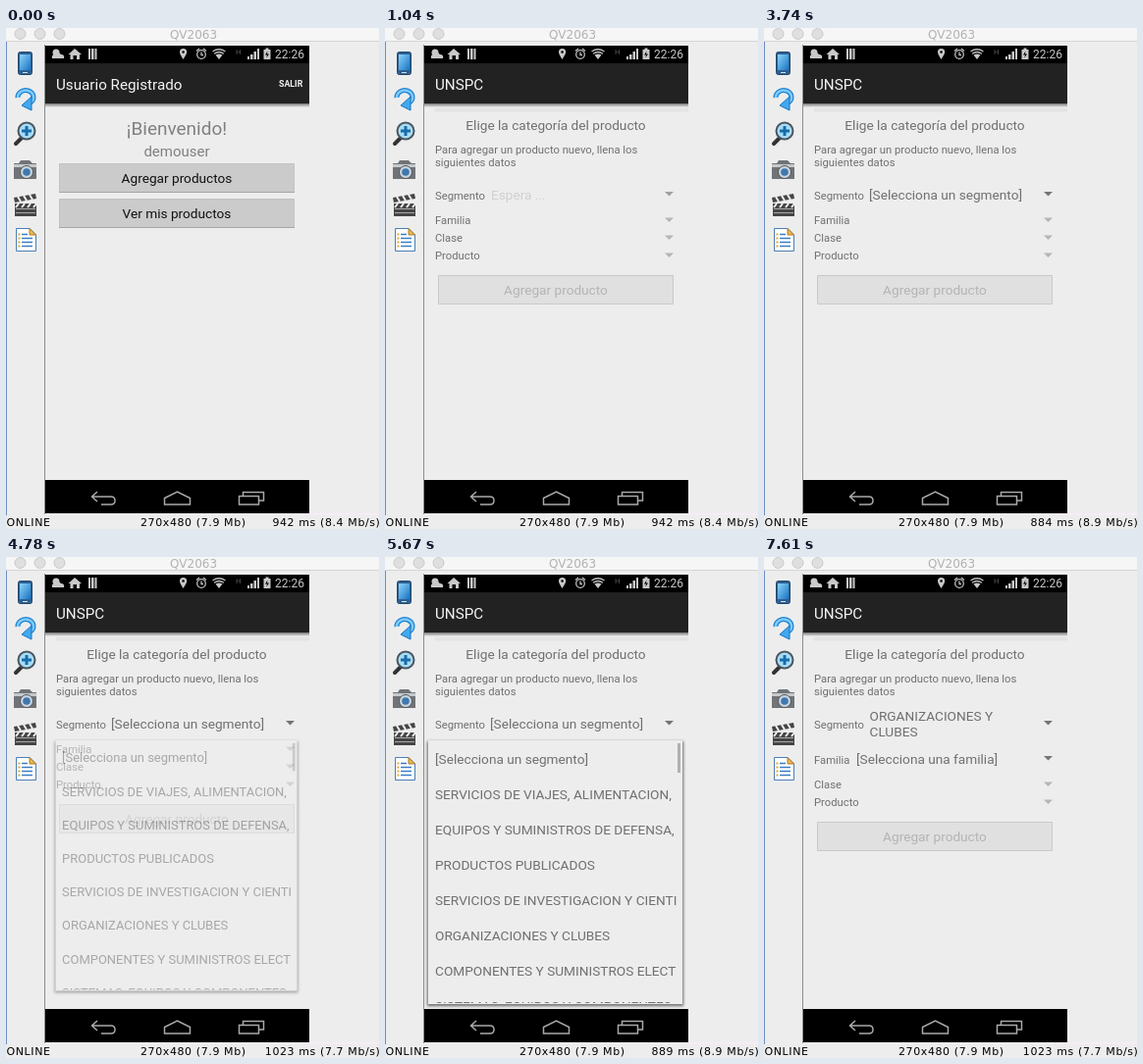
Recreate the animation shown at these times as an HTML page. Size 380x511 px, loop 8000 ms.

```html
<!DOCTYPE html>
<html lang="es">
<head>
<meta charset="utf-8">
<title>Agregar producto</title>
<style>
  html, body { margin: 0; width: 100%; height: 100%; overflow: hidden; background: #ededed; }
  svg { display: block; width: 380px; height: 511px; font-family: Roboto, sans-serif; }
  .desk { font: 11px "DejaVu Sans", sans-serif; letter-spacing: .6px; }
  .bar { font-size: 15.2px; fill: #f4f4f4; }
  .small { font-size: 11.25px; fill: #707070; }
  .value { font-size: 13.65px; fill: #707070; }
  .off { fill: #b4b4b4; }
  .dark { fill: #111; }
  .mid { text-anchor: middle; }
</style>
</head>
<body>
<svg viewBox="0 0 380 511">
  <defs>
    <linearGradient id="blue" x2="1" y2="1">
      <stop stop-color="#8fd4fa"/><stop offset="1" stop-color="#1673c4"/>
    </linearGradient>
    <linearGradient id="shade" x2="0" y2="1">
      <stop stop-color="#777"/><stop offset="1" stop-color="#ededed"/>
    </linearGradient>
    <filter id="blur" x="-5%" y="-5%" width="110%" height="110%"><feGaussianBlur stdDeviation="1.5"/></filter>
    <clipPath id="listClip"><path d="M44 187H298V455H44z"/></clipPath>
  </defs>

  <!-- desktop window -->
  <path fill="#ededed" d="M0 0H380V511H0z"/>
  <path fill="#f6f6f6" d="M0 0H380V13H0z"/>
  <path fill="#d5d5d5" d="M0 13H380V14H0z"/>
  <path fill="#6d8fc0" d="M0 14H1V497H0z"/>
  <g fill="#dfdfdf" stroke="#cacaca">
    <circle cx="14.500" cy="6" r="5.500"/><circle cx="34.500" cy="6" r="5.500"/><circle cx="54.500" cy="6" r="5.500"/>
  </g>
  <text class="mid" x="191" y="11" font-size="12" fill="#b2b2b2" style="font-family:'DejaVu Sans',sans-serif">QV2063</text>

  <!-- toolbar -->
  <g id="tools">
    <rect x="12.500" y="24.500" width="14" height="23" rx="2" fill="#2d5f91" stroke="#25476b"/>
    <path fill="url(#blue)" d="M14 27H25V43H14z"/>
    <path stroke="#cfe2f2" d="M17 45.500H22"/>
    <path fill="none" stroke="#1d83d2" stroke-width="5" d="M12 71A8 7 0 1 1 25 76"/>
    <path fill="none" stroke="#7fcbfa" stroke-width="2.500" d="M12 71A8 7 0 1 1 25 76"/>
    <path fill="#42a8ee" stroke="#1873c0" d="M26 70V84L16 79z"/>
    <path stroke="#333" stroke-width="4" stroke-linecap="round" d="M10 118L16 112"/>
    <circle cx="21" cy="105" r="8.500" fill="#a8dcf4" stroke="#4b5660" stroke-width="2"/>
    <path stroke="#176da9" stroke-width="3" d="M16 105H26M21 100V110"/>
    <path fill="#707478" d="M8 138H13L15 135H24L27 138H31V154H8z"/>
    <path fill="#c6cacc" d="M8 139H31V142H8z"/>
    <circle cx="21" cy="147" r="6.500" fill="#c9d5df" stroke="#555"/>
    <circle cx="21" cy="147" r="3.800" fill="#3f78ad"/>
    <path fill="#454545" d="M9 179H31V192H9zM8 173L30 169L31 174L9 178z"/>
    <path stroke="#f1f1f1" stroke-width="2" d="M12 172L15 177M18 171L21 176M24 170L27 175M13 179L10 183M19 179L16 183M25 179L22 183M31 179L28 183"/>
    <path stroke="#aaa" d="M10 184.500H30M10 188.500H30"/>
    <path fill="#fff" stroke="#4b7fb5" d="M10.500 204.500H24L30.500 211V227.500H10.500z"/>
    <path fill="#f0b84c" stroke="#a97c2d" d="M24 204.500V211H30.500z"/>
    <path stroke="#397dc2" stroke-width="1.500" d="M16 210.500H22M16 214.500H27M16 218.500H27M16 222.500H27"/>
    <path stroke="#e2a63c" stroke-width="2" d="M12.500 210.500H14.500M12.500 214.500H14.500M12.500 218.500H14.500M12.500 222.500H14.500"/>
  </g>

  <!-- phone -->
  <path fill="#8c8c8c" d="M39 17H40V496H39z"/>
  <path fill="#f7ecf7" d="M40 495H380V496.500H40z"/>
  <path d="M40 18H309V36H40zM40 461H309V495H40z"/>
  <path fill="#222" d="M40 36H309V77H40z"/>
  <path fill="url(#shade)" d="M40 77H309V81H40z"/>
  <g fill="#c9c9c9">
    <circle cx="51" cy="25" r="3.500"/>
    <path d="M47 31Q46 27 50 27Q53 23 56 27Q60 27 59 31z"/>
    <path d="M70 21L77 27H75V32H72V28H68.500V32H65.500V27H63.500z"/>
    <path d="M84 21H86V32H84zM87 21H89.500V32H87zM90.500 21H92.500V32H90.500z"/>
    <path fill-rule="evenodd" d="M180.500 32C179 29 177 27 177 24.500A3.600 3.600 0 0 1 184.200 24.500C184.200 27 182 29 180.500 32zM179.300 24.500A1.300 1.300 0 0 0 181.900 24.500A1.300 1.300 0 0 0 179.300 24.500z"/>
    <path d="M217 32L213.500 27.500Q217 25.300 220.500 27.500z"/>
    <path d="M246 32V29H248V32zM249 32V27H251.500V32zM252.500 32V24H255V32zM256 32V21H258V32z"/>
    <path fill-rule="evenodd" d="M262.500 22H264.500V20.500H267.500V22H269.500V32H262.500zM266.500 23.500L264 27.500H266L265.300 30.500L268 26.500H266z"/>
    <text x="274" y="31" font-size="12">22:26</text>
    <text x="234" y="27" font-size="8" fill="#555">H</text>
  </g>
  <g fill="none" stroke="#bdbdbd" stroke-width="1.300">
    <circle cx="199" cy="27" r="4.300"/>
    <path d="M199 24.500V27.500H201M194 23.500L197 21M204 23.500L201 21"/>
    <path d="M210.500 24Q217 19.500 223.500 24M212 26.200Q217 22.800 222 26.200"/>
  </g>
  <g fill="none" stroke="#a9a9a9" stroke-width="1.500">
    <path d="M93 473L87.500 478L93 483M88 478H107Q111 478 111 482T107 486H97"/>
    <path d="M161.500 486V479.500L174.500 473L187.500 479.500V486z"/>
    <path d="M237.500 477.500H257.500V486H237.500zM241.500 477V473.500H262.500V482H258"/>
  </g>

  <g id="home">
    <text class="bar" x="51" y="63">Usuario Registrado</text>
    <text x="278" y="60" font-size="8.800" font-weight="700" fill="#f4f4f4">SALIR</text>
    <g class="mid">
      <text x="174" y="109" font-size="19" fill="#808080">¡Bienvenido!</text>
      <text x="174" y="131" font-size="15" fill="#808080">demouser</text>
    </g>
  </g>

  <g id="form">
    <text class="bar" x="51" y="63">UNSPC</text>
    <path fill="#e3e3e3" d="M51 82H309V85.500H51z"/>
    <text class="value mid" x="174" y="104">Elige la categoría del producto</text>
    <text class="small" x="51" y="128">Para agregar un producto nuevo, llena los</text>
    <text class="small" x="51" y="141">siguientes datos</text>
    <text class="small" x="51" y="174.500">Segmento</text>
    <g id="waiting"></g>
    <g id="segment"></g>
    <g id="early"></g>
    <g id="chosen"></g>
  </g>

  <g id="popup">
    <rect x="43" y="188" width="261" height="270" fill="#000" opacity=".55" filter="url(#blur)"/>
    <path fill="#ededed" d="M44 187H303V456H44z"/>
    <g id="list" class="value" clip-path="url(#listClip)"></g>
    <path fill="#b0b0b0" d="M298 190H301V220H298z"/>
  </g>

  <!-- status line -->
  <g class="desk">
    <text x="0.500" y="508">ONLINE</text>
    <text x="137" y="508">270x480 (7.9 Mb)</text>
    <text id="speed" x="381.500" y="508" text-anchor="end"></text>
  </g>
</svg>

<script>
const $ = id => document.getElementById(id);
const add = (id, ...parts) => $(id).insertAdjacentHTML('beforeend', parts.join(''));
const text = (cls, x, y, s) => `<text class="${cls}" x="${x}" y="${y}">${s}</text>`;
const caret = (y, color) => `<path fill="${color}" d="M285 ${y - 2}h9l-4.500 4.500z"/>`;
const button = (y, label, enabled) =>
  `<path fill="${enabled ? '#cbcbcb' : '#e0e0e0'}" stroke="${enabled ? '#c3c3c3' : '#c9c9c9'}" d="M54.500 ${y + .5}h239v29h-239z"/>` +
  (enabled ? `<path fill="#a5a5a5" d="M54 ${y + 29}h240v1h-240z"/>` : '') +
  text('value mid ' + (enabled ? 'dark' : 'off'), 174, y + 20, label);
const emptyField = (label, y) => text('small', 51, y, label) + caret(y - 4, '#b5b5b5');

const DARK = '#747474';
add('home', button(138, 'Agregar productos', true), button(174, 'Ver mis productos', true));
add('waiting', text('value', 108, 174.5, 'Espera ...').replace('<text', '<text style="fill:#d0d0d0"'), caret(169, '#a0a0a0'));
add('segment', text('value', 107, 174.5, '[Selecciona un segmento]'), caret(169, DARK));
add('early', emptyField('Familia', 199.5), emptyField('Clase', 217.5), emptyField('Producto', 235.5),
  button(252, 'Agregar producto', false));
add('chosen', text('value', 107.5, 167, 'ORGANIZACIONES Y'), text('value', 107.5, 182.5, 'CLUBES'), caret(169, DARK),
  text('small', 51, 210.5, 'Familia'), text('value', 94, 210.5, '[Selecciona una familia]'), caret(205, DARK),
  emptyField('Clase', 235.5), emptyField('Producto', 253.5), button(270, 'Agregar producto', false));
add('list', ...[
  '[Selecciona un segmento]',
  'SERVICIOS DE VIAJES, ALIMENTACION,',
  'EQUIPOS Y SUMINISTROS DE DEFENSA,',
  'PRODUCTOS PUBLICADOS',
  'SERVICIOS DE INVESTIGACION Y CIENTI',
  'ORGANIZACIONES Y CLUBES',
  'COMPONENTES Y SUMINISTROS ELECT',
  'SISTEMAS, EQUIPOS Y COMPONENTES'
].map((s, i) => text('value', 51, 210.5 + 36 * i, s)));

const LOOP = 8000;
// [start time, transfer time], both in ms
const transfers = [[0, 942], [140, 963], [1040, 942], [1940, 905], [2840, 921],
  [3740, 884], [4780, 1023], [5670, 889], [6570, 868], [7610, 1023]];

const show = (id, on) => $(id).style.display = on ? '' : 'none';

function draw(t) {
  show('home', t < 140);
  show('form', t >= 140);
  show('waiting', t < 1190);
  show('segment', t >= 1190 && t < 5820);
  show('early', t < 5820);
  show('chosen', t >= 5820);
  show('popup', t >= 3880 && t < 5820);

  const opening = t < 4920;
  $('popup').setAttribute('opacity', opening ? .55 : 1);
  $('popup').setAttribute('transform', `translate(173.5 187) scale(${opening ? .95 : 1}) translate(-173.5 -187)`);

  const ms = transfers.filter(([start]) => start <= t).pop()[1];
  $('speed').textContent = `${ms} ms (${(7910 / ms).toFixed(1)} Mb/s)`;
}

function tick() {
  draw(performance.now() % LOOP);
  requestAnimationFrame(tick);
}
tick();
</script>
</body>
</html>
```
